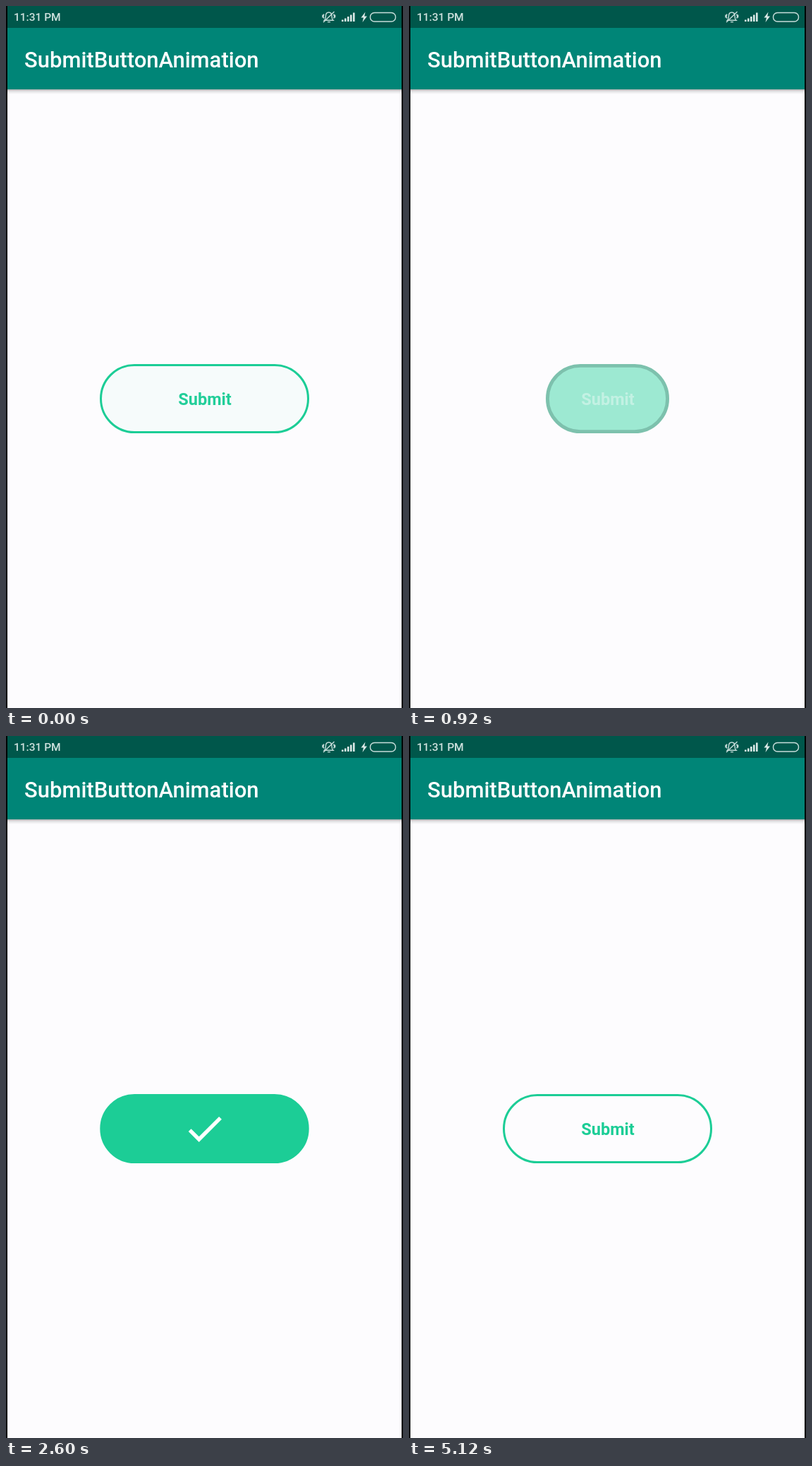
These frames come from a looping animation (563 px wide and 994 px high, 6080 ms). An HTML page:

```html
<!DOCTYPE html>
<html lang="en">
<head>
<meta charset="utf-8">
<title>Submit button</title>
<style>
  html, body { margin: 0; width: 100%; height: 100%; overflow: hidden; background: #fdfcfe; }
  svg { display: block; width: 100%; height: 100%; }
  text { font-family: Roboto, "Noto Sans", sans-serif; font-weight: 500; }
</style>
</head>
<body>
<svg viewBox="0 0 563 994">
  <defs>
    <linearGradient id="shade" x1="0" y1="0" x2="0" y2="1">
      <stop offset="0" stop-color="#000" stop-opacity=".3"/>
      <stop offset=".4" stop-color="#000" stop-opacity=".1"/>
      <stop offset="1" stop-color="#000" stop-opacity="0"/>
    </linearGradient>
  </defs>
  <rect width="563" height="994" fill="#fdfcfe"/>
  <rect y="118" width="563" height="7" fill="url(#shade)"/>
  <rect y="31" width="563" height="87" fill="#008577"/>
  <rect width="563" height="31" fill="#00574b"/>
  <text x="11" y="21.3" font-size="15.5" fill="#cfe1de">11:31 PM</text>
  <text x="26" y="87" font-size="31" fill="#fff">SubmitButtonAnimation</text>

  <!-- status icons -->
  <g fill="none" stroke="#c9dddA" stroke-width="1.4">
    <path d="M451.500 20.200h12.500c-1.800-1.500-2-3-2-5.700c0-3.500-1.500-5.500-4.300-5.500s-4.300 2-4.300 5.500c0 2.700-.200 4.200-1.900 5.700z"/>
    <path d="M450 23L465.500 8M456 22.600h4M451 11.500c-1.200 1.800-1.200 4.200 0 6M464.600 11.500c1.200 1.800 1.200 4.200 0 6M449 12.500v4M466.600 12.500v4"/>
    <rect x="516.500" y="9.500" width="36" height="12.500" rx="6"/>
  </g>
  <g fill="#dbe8e6">
    <path d="M476 19.500h2.600v2.500h-2.600zM480 17.500h2.600v4.500h-2.600zM484 15h2.600v7h-2.600zM488 12.500h2.600v9.500h-2.600zM492 9.500h2.600v12.500h-2.600z"/>
    <path d="M509.500 8.500L503.500 16.500H507L505.500 23L512 14.500H508.300z"/>
  </g>

  <rect id="pill"/>
  <circle id="arc" cx="281.5" cy="556" r="46" fill="none" stroke-width="6" pathLength="1" transform="rotate(-90 281.5 556)"/>
  <text id="label" x="282" y="565.4" font-size="23.5" text-anchor="middle" style="font-weight:700">Submit</text>
  <path id="check" fill="#fff" transform="translate(249.600 524) scale(2.680)" d="M9 16.170L4.830 12l-1.420 1.410L9 19 21 7l-1.410-1.410z"/>

  <path d="M0 0h2v994h-2zM561 0h2v994h-2z" fill="#000"/>
</svg>
<script>
const LOOP = 6080, STEP = 40;
const CX = 281.5, CY = 556, WIDE = 297, TALL = 98, THIN = 3, THICK = 6;
const GREEN = [28, 205, 150], GREY = [186, 186, 188], WHITE = [255, 255, 255];

const $ = id => document.getElementById(id);
const pill = $('pill'), arc = $('arc'), label = $('label'), check = $('check');

const set = (el, attrs) => { for (const k in attrs) el.setAttribute(k, attrs[k]); };
const part = (t, from, to) => Math.min(1, Math.max(0, (t - from) / (to - from)));
const ease = x => (1 - Math.cos(Math.PI * x)) / 2;
const lerp = (a, b, p) => a + (b - a) * p;
const mix = (a, b, p) => `rgb(${a.map((v, i) => Math.round(lerp(v, b[i], p)))})`;

function pose(t) {
  const s = { narrow: 0, fill: 0, edge: mix(GREEN, GREY, 0), turn: 0,
              text: 1, ink: mix(GREEN, WHITE, 0), tick: 0 };
  if (t < 478) {            // press: the fill floods in
    s.fill = ease(part(t, -55, 478));
    s.ink = mix(GREEN, WHITE, s.fill);
  } else if (t < 1250) {    // shrink to a ring
    const x = part(t, 478, 1250);
    s.narrow = ease(x);
    s.fill = 1 - x;
    s.edge = mix(GREEN, GREY, s.narrow);
    s.ink = mix(WHITE, WHITE, 0);
    s.text = 1 - s.narrow;
  } else if (t < 1901) {    // progress
    s.narrow = 1;
    s.edge = mix(GREY, GREY, 0);
    s.turn = ease(part(t, 1250, 1901));
    s.text = 0;
  } else if (t < 3680) {    // grow with the tick
    const p = ease(part(t, 1901, 2625));
    s.narrow = 1 - p;
    s.fill = s.tick = p;
    s.text = 0;
  } else {                  // back to rest
    const p = ease(part(t, 3680, 4160));
    s.fill = s.tick = 1 - p;
    s.text = p;
  }
  return s;
}

function draw(t) {
  const s = pose(t);
  const line = lerp(THIN, THICK, s.narrow);
  const w = lerp(WIDE, TALL, s.narrow) - line, h = TALL - line;
  set(pill, {
    x: CX - w / 2, y: CY - h / 2, width: w, height: h, rx: h / 2,
    fill: mix(GREEN, GREEN, 0), 'fill-opacity': s.fill,
    stroke: s.edge, 'stroke-width': line
  });
  set(arc, {
    stroke: mix(GREEN, GREEN, 0), 'stroke-dasharray': `${s.turn} 2`,
    visibility: s.turn > 0 ? 'visible' : 'hidden'
  });
  set(label, { fill: s.ink, opacity: s.text });
  set(check, { opacity: s.tick });
}

const start = performance.now();
function tick() {
  const t = (performance.now() - start) % LOOP;
  draw(Math.floor(t / STEP) * STEP);
  requestAnimationFrame(tick);
}
tick();
</script>
</body>
</html>
```
